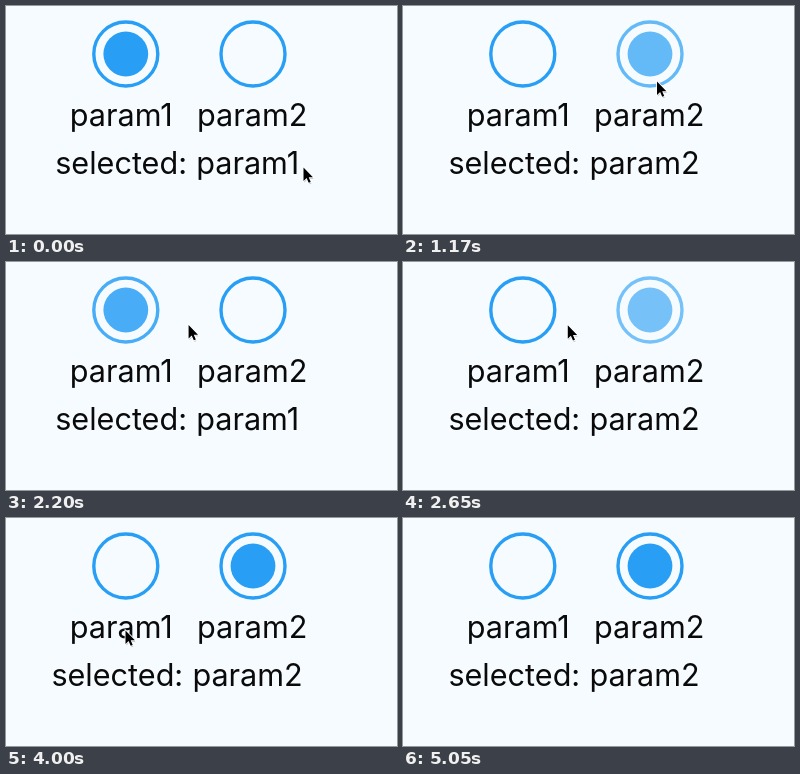
An HTML page that plays this animation: 391x228 px, repeating every 5.8 s.

```html
<!DOCTYPE html>
<html lang="en">
<head>
<meta charset="utf-8">
<title>Radio buttons</title>
<style>
  html, body { margin: 0; width: 100%; height: 100%; overflow: hidden; background: #f5fbff; }
  svg { display: block; width: 391px; height: 228px; }
  text { font: 400 30.6px Inter, "Liberation Sans", sans-serif; fill: #0a0a0a; }
  .ring { fill: none; stroke: #289ff5; stroke-width: 3.4; }
  .dot { fill: #289ff5; }
</style>
</head>
<body>
<svg viewBox="0 0 391 228">
  <defs>
    <path id="arrow" d="M0 0V16L3.7 12.5 6.2 18.2 8.6 17.2 6.2 11.5H11.2Z"/>
  </defs>
  <g class="radio" transform="translate(119.8 48)">
    <circle class="ring" r="32"/><circle class="dot" r="22.4"/>
  </g>
  <g class="radio" transform="translate(247 48)">
    <circle class="ring" r="32"/><circle class="dot" r="22.4"/>
  </g>
  <text x="63.8" y="119.6">param1</text>
  <text x="191" y="119.6">param2</text>
  <g id="status">
    <text x="49.2" y="168">selected:</text>
    <text id="value" x="190.2" y="168">param1</text>
  </g>
  <g id="cursor">
    <use href="#arrow" x=".8" y="1.8" opacity=".25"/>
    <use href="#arrow" stroke="#fff" stroke-width="2" paint-order="stroke"/>
  </g>
</svg>
<script>
const LOOP = 5800;
const $ = id => document.getElementById(id);
const radios = [...document.querySelectorAll('.radio')];
const dots = radios.map(r => r.querySelector('.dot'));

// Pointer moves: start, end, x, y
const home = [297.5, 161.5];
const moves = [
  [0, 400, 250, 56], [735, 880, 254, 75.5], [1030, 1610, 124.5, 58.5],
  [2060, 2350, 247, 68], [2480, 2755, 125, 61], [3100, 3400, 276.5, 68.5],
  [3400, 3650, 256, 69], [3700, 4000, 119.5, 112.5],
  [4150, 4600, 248, 113], [4700, 5050, 340, 250]
];
const clicks = [870, 2000, 2520, 3050, 3650, 4100, 4680];

const clamp = v => Math.max(0, Math.min(1, v));
const ease = k => k * k * (3 - 2 * k);

// The screen refreshes in steps, slightly slower after 2200 ms
function snap(t) {
  return t < 2200
    ? Math.floor(t * 3 / 440) * 440 / 3
    : 2200 + Math.floor((t - 2200) / 150) * 150;
}

function pointerAt(t) {
  let [x, y] = home;
  for (const [from, to, toX, toY] of moves) {
    const k = ease(clamp((t - from) / (to - from)));
    x += (toX - x) * k;
    y += (toY - y) * k;
  }
  return [x, y];
}

// Dims to 0.2 while pressed, then recovers after the release
function fade(t, up) {
  return t < up
    ? 1 - 0.8 * clamp((t - up + 170) / 150)
    : 0.2 + 0.8 * clamp((t - up) / 250);
}

function render(time) {
  const t = snap(time);
  const opacity = [1, 1];
  let selected = 0;
  for (const up of clicks) {
    const [x, y] = pointerAt(up);
    const option = x < 183 ? 0 : 1;
    if (t >= up) selected = option;
    if (y < 90) opacity[option] *= fade(t, up); // labels do not dim
  }
  radios.forEach((r, i) => {
    r.setAttribute('opacity', opacity[i]);
    dots[i].setAttribute('visibility', i === selected ? 'visible' : 'hidden');
  });
  $('value').textContent = 'param' + (selected + 1);
  $('status').setAttribute('transform', `translate(${selected ? -3.8 : 0} 0)`);
  $('cursor').setAttribute('transform', `translate(${pointerAt(t)}) scale(.84)`);
}

const start = performance.now();
function loop(now) {
  render(Math.max(0, now - start) % LOOP);
  requestAnimationFrame(loop);
}
render(0);
requestAnimationFrame(loop);
</script>
</body>
</html>
```
